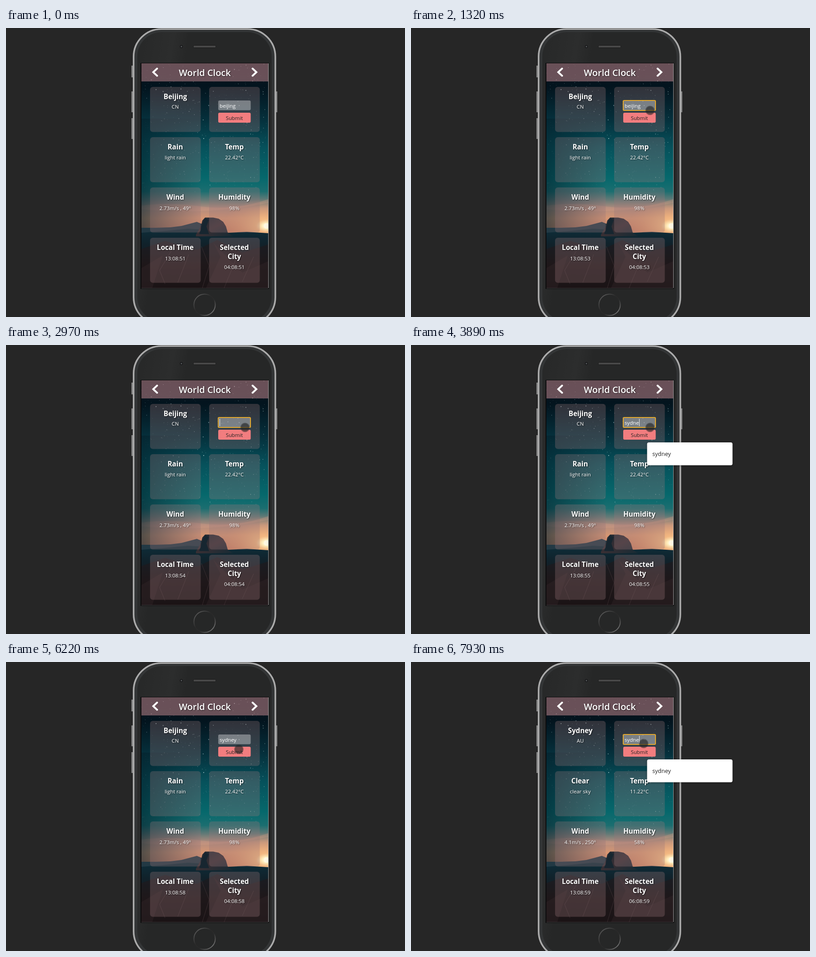
An HTML page that plays this animation: 878x638 px, repeating every 8 s.

```html
<!DOCTYPE html>
<html lang="en">
<head>
<meta charset="utf-8">
<title>World Clock</title>
<style>
  html, body { margin: 0; width: 100%; height: 100%; overflow: hidden; background: #262626; }
  svg { display: block; font-family: "Open Sans", "Noto Sans", sans-serif; }
  .label { fill: #fff; font-size: 11.4px; font-weight: 500; text-anchor: middle; }
  .head { font-size: 15.2px; font-weight: 700; }
  .title { font-size: 20px; font-weight: 600; }
  .shadowed { filter: drop-shadow(1px 1.5px 1px rgba(0, 0, 0, .6)); }
  #popup { filter: drop-shadow(0 1px 2px rgba(0, 0, 0, .45)); }
</style>
</head>
<body>
<svg id="stage" width="878" height="638" viewBox="0 0 878 638">
  <defs>
    <linearGradient id="body" x1="0" y1="0" x2=".35" y2=".12">
      <stop offset="0" stop-color="#272828"/><stop offset=".7" stop-color="#2c2d2d"/>
      <stop offset="1" stop-color="#262727"/>
    </linearGradient>
    <linearGradient id="home" x1="0" y1="0" x2="1" y2="1">
      <stop offset="0" stop-color="#686868"/><stop offset=".42" stop-color="#2a2a2a"/>
      <stop offset=".6" stop-color="#2a2a2a"/><stop offset="1" stop-color="#929292"/>
    </linearGradient>
    <linearGradient id="sky" gradientUnits="userSpaceOnUse" x1="0" y1="78" x2="0" y2="450">
      <stop offset="0" stop-color="#05111a"/><stop offset=".14" stop-color="#03141e"/>
      <stop offset=".33" stop-color="#052f3b"/><stop offset=".5" stop-color="#06515b"/>
      <stop offset=".68" stop-color="#06686c"/><stop offset=".76" stop-color="#1b6e70"/>
      <stop offset=".81" stop-color="#637a77"/><stop offset=".86" stop-color="#b28c7d"/>
      <stop offset=".92" stop-color="#d69673"/><stop offset="1" stop-color="#cd8263"/>
    </linearGradient>
    <linearGradient id="dusk">
      <stop offset="0" stop-color="#04222d" stop-opacity=".62"/>
      <stop offset="1" stop-color="#04222d" stop-opacity="0"/>
    </linearGradient>
    <linearGradient id="ground" x1="0" y1="0" x2="0" y2="1">
      <stop offset="0" stop-color="#0e2e3a"/><stop offset=".25" stop-color="#10222b"/>
      <stop offset=".6" stop-color="#1b171a"/><stop offset="1" stop-color="#130e10"/>
    </linearGradient>
    <linearGradient id="dome" x1="0" y1="0" x2="1" y2="1">
      <stop offset="0" stop-color="#1b2832"/><stop offset=".5" stop-color="#382f34"/>
      <stop offset="1" stop-color="#152a34"/>
    </linearGradient>
    <radialGradient id="sun">
      <stop offset="0" stop-color="#fffbe8"/><stop offset=".1" stop-color="#fff0c0"/>
      <stop offset=".25" stop-color="#fcc487" stop-opacity=".75"/>
      <stop offset="1" stop-color="#f0a070" stop-opacity="0"/>
    </radialGradient>
    <radialGradient id="touch">
      <stop offset="0" stop-color="#222" stop-opacity=".62"/>
      <stop offset=".75" stop-color="#222" stop-opacity=".66"/>
      <stop offset="1" stop-color="#222" stop-opacity=".3"/>
    </radialGradient>
    <clipPath id="screen"><path d="M298 78H577V574H298Z"/></clipPath>
  </defs>

  <path d="M276 83h4v26h-4zM276 140h4v46h-4zM276 199h4v46h-4zM593 140h4v46h-4z" fill="#858585"/>
  <rect x="280.800" y="2.200" width="311.900" height="653" rx="61" fill="#333536" stroke="#ababab" stroke-width="3.600"/>
  <rect x="289" y="9" width="295.500" height="639" rx="54" fill="url(#body)"/>
  <rect x="412" y="38.500" width="50" height="5" rx="2.500" fill="#484848" stroke="#1b1b1b"/>
  <circle cx="386" cy="41" r="4.500" fill="#1c1d1e" stroke="#303030"/>
  <circle cx="386" cy="41" r="1.500" fill="#5a5d60"/>
  <circle cx="437" cy="611" r="23.500" fill="none" stroke="url(#home)" stroke-width="2"/>

  <path d="M296 77H579V576H296Z" fill="#0b0b0c"/>
  <g clip-path="url(#screen)">
    <path d="M298 78H577V460H298Z" fill="url(#sky)"/>
    <g id="stars" fill="#c9e4e4"></g>
    <path d="M298 392Q360 384 430 394T577 378V386Q500 402 430 404T298 400Z" fill="#e0a087" opacity=".25"/>
    <path d="M298 200H430V460H298Z" fill="url(#dusk)"/>
    <ellipse cx="574" cy="437" rx="95" ry="60" fill="url(#sun)"/>
    <circle cx="573" cy="437" r="6" fill="#fff8e2"/>
    <path d="M298 441L330 441 362 440 386 437 405 432 420 428 432 433 450 460H298Z" fill="#223944"/>
    <path d="M298 452L350 448 400 443 450 446 490 452 530 450 577 453V574H298Z" fill="url(#ground)"/>
    <path d="M418 456L429 437 432 425 438 418.500 456 418.500 468 421 478 428 484 438 488 452 500 460H418Z" fill="url(#dome)"/>
    <path d="M438 420L446 424 441 438 447 455 425 455 432 432Z" fill="#172630"/>
    <path d="M298 488L350 470 420 490 465 468 520 496 577 478V574H298Z" fill="#21191b" opacity=".55"/>
    <path d="M440 574L472 505 456 474 520 540 577 515V574ZM298 530L345 502 322 574H298Z" fill="#34272a" opacity=".4"/>
    <path d="M430 482L447 525 432 574M365 490L338 535 350 565M402 500L378 562M510 500L480 574M545 505L520 560" fill="none" stroke="#4d3c40" opacity=".55"/>
  </g>
  <path d="M298 78H577V118H298Z" fill="#ac7a80" fill-opacity=".6"/>
  <path d="M577.500 78V574" stroke="#a3a3a3"/>
  <path d="M298 574.500H577" stroke="#3c3c3c"/>
  <path d="M332.500 89.500L324 97.500 332.500 105.500M542.500 89.500L551 97.500 542.500 105.500" fill="none" stroke="#fff" stroke-width="4" stroke-linecap="round"/>
  <g id="cards" fill="#997678" fill-opacity=".31"></g>

  <rect x="467" y="160" width="71.500" height="21.500" rx="3" fill="#fff" fill-opacity=".35"/>
  <rect id="ring" x="467" y="160" width="71" height="22" rx="2" fill="none" stroke="#e5a92c" stroke-width="2"/>
  <rect x="467" y="187" width="71.500" height="22" rx="3" fill="#f27d7f"/>
  <text x="502.500" y="202.500" class="label" style="fill:#252525">Submit</text>
  <text id="entry" x="470" y="176" fill="#fff" font-size="11.400" font-weight="500"></text>
  <path id="caret" stroke="#eee"/>
  <g id="labels" class="shadowed"></g>
  <circle id="cursor" r="10.500" fill="url(#touch)"/>
  <g id="popup">
    <rect x="519.500" y="215" width="188" height="50.500" rx="4" fill="#fff"/>
    <text id="hint" x="531" y="245" font-size="12.600" fill="#222"></text>
  </g>
</svg>

<script>
const LOOP = 8000;
const $ = id => document.getElementById(id);

function add(parent, tag, attrs, text = "") {
  const node = document.createElementNS("http://www.w3.org/2000/svg", tag);
  for (const key in attrs) node.setAttribute(key, attrs[key]);
  node.textContent = text;
  return $(parent).appendChild(node);
}

const label = (x, y, text = "", kind = "") =>
  add("labels", "text", { x, y, class: "label " + kind }, text);

// Night sky
let seed = 7;
const random = () => (seed = seed * 16807 % 2147483647) / 2147483647;
for (let i = 0; i < 520; i++) {
  const depth = random();
  add("stars", "circle", {
    cx: 298 + random() * 279, cy: 78 + depth * 285,
    r: .35 + random() ** 3 * .6, opacity: (.25 + random() * .6) * (1.1 - depth * .6)
  });
}
add("stars", "circle", { cx: 435, cy: 244, r: 1, opacity: .8 });

// Cards and their labels
for (const x of [317, 447])
  for (let row = 0; row < 4; row++)
    add("cards", "rect", { x, y: 130 + row * 111, width: 111.5, height: 99.5, rx: 6 });

const LEFT = 372.5, RIGHT = 502.5;
label(437.5, 106, "World Clock", "title");
label(RIGHT, 267.5, "Temp", "head");
label(LEFT, 378.5, "Wind", "head");
label(RIGHT, 378.5, "Humidity", "head");
label(LEFT, 489.5, "Local Time", "head");
label(RIGHT, 489.5, "Selected", "head");
label(RIGHT, 509.5, "City", "head");
const fields = [
  label(LEFT, 156.5, "", "head"), label(LEFT, 178),
  label(LEFT, 267.5, "", "head"), label(LEFT, 290),
  label(RIGHT, 290), label(LEFT, 401.5), label(RIGHT, 401.5)
];
const localTime = label(LEFT, 512.5), cityTime = label(RIGHT, 532);

const beijing = ["Beijing", "CN", "Rain", "light rain", "22.42°C", "2.73m/s , 49°", "98%"];
const sydney = ["Sydney", "AU", "Clear", "clear sky", "11.22°C", "4.1m/s , 250°", "58%"];

// Timeline
const typing = [
  [0, "beijing"], [1720, "beijin"], [1980, "beiji"], [2060, "beij"], [2140, "bei"],
  [2220, "be"], [2300, "b"], [2490, ""], [3040, "s"], [3200, "sy"], [3510, "syd"],
  [3740, "sydn"], [3890, "sydne"], [3970, "sydney"], [7930, "sydne"]
];
const caretToggles = [790, 1320, 1790, 2290, 2740, 3200, 3510, 4500, 5010, 5440, 5760, 5950, 7250, 7780, 7930];
const path = [
  [70, 735, 574], [860, 526, 174], [940, 526, 174], [1090, 526, 182], [4500, 526, 182],
  [5050, 526, 196], [5440, 526, 196], [5760, 514, 196], [5910, 514, 196],
  [6510, 511, 190], [6840, 511, 188], [7310, 512, 180], [LOOP, 512, 180]
];

const within = (t, from, to) => t >= from && t < to;
const show = (id, visible) => $(id).setAttribute("visibility", visible ? "visible" : "hidden");

function cursorAt(t) {
  const i = Math.max(1, path.findIndex(point => point[0] > t));
  const [t0, x0, y0] = path[i - 1], [t1, x1, y1] = path[i];
  const p = Math.max(0, (t - t0) / (t1 - t0)), ease = p * p * (3 - 2 * p);
  return [x0 + (x1 - x0) * ease, y0 + (y1 - y0) * ease];
}

function draw(t) {
  const seconds = 51 + Math.max(0, Math.floor((t - 75) / 995) + 1);
  localTime.textContent = "13:08:" + seconds;
  cityTime.textContent = (seconds > 58 ? "06" : "04") + ":08:" + seconds;

  const weather = t < 6300 ? beijing : sydney;
  fields.forEach((field, i) => field.textContent = weather[i]);

  const entry = $("entry");
  entry.textContent = typing.findLast(step => step[0] <= t)[1];
  const caretX = Math.round(470 + entry.getComputedTextLength()) + .5;
  $("caret").setAttribute("d", `M${caretX} 163V179`);
  show("caret", caretToggles.filter(time => time <= t).length % 2);
  show("ring", within(t, 790, 5950) || t >= 7250);

  const [x, y] = cursorAt(t);
  $("cursor").setAttribute("transform", `translate(${x} ${y})`);
  show("cursor", t >= 70);

  $("hint").textContent = t < 2800 ? "beijing" : "sydney";
  show("popup", within(t, 1790, 2570) || within(t, 3040, 3970) || t >= 7930);
}

function tick() {
  draw(performance.now() % LOOP);
  requestAnimationFrame(tick);
}
tick();
</script>
</body>
</html>
```
